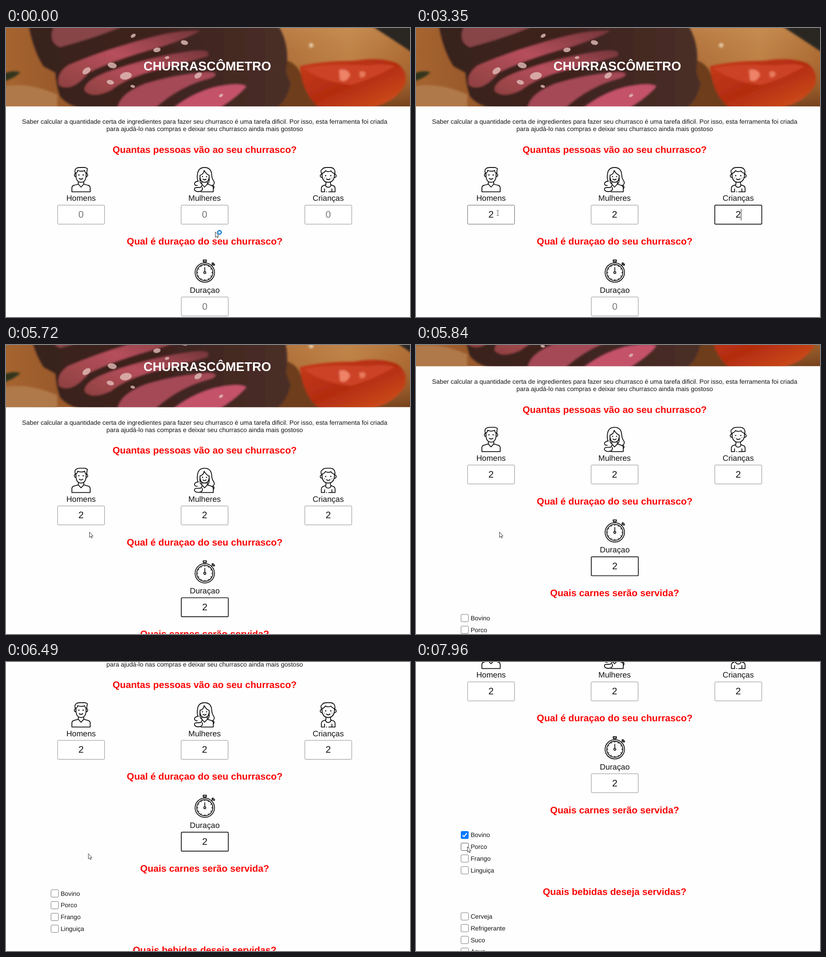
Recreate the animation shown at these times as an HTML page. Size 883 by 634 pixels, loop 8000 ms.

```html
<!DOCTYPE html>
<html lang="pt">
<head>
<meta charset="utf-8">
<title>Churrascômetro</title>
<style>
html, body { margin: 0; width: 100%; height: 100%; overflow: hidden; background: #fefefe; }
svg { display: block; width: 883px; height: 634px; font-family: "Liberation Sans", Arial, sans-serif; text-rendering: geometricPrecision; }
.mid { text-anchor: middle; }
.h { font-weight: bold; font-size: 20.7px; fill: #fb0505; }
.label { font-size: 17.25px; fill: #111; }
.p { font-size: 13.8px; fill: #161616; }
.num { font-size: 20.7px; }
.icon { fill: none; stroke: #111; stroke-width: 1.8; stroke-linecap: round; stroke-linejoin: round; }
.dot { fill: #111; stroke: none; }
</style>
</head>
<body>
<svg viewBox="0 0 883 634" xmlns="http://www.w3.org/2000/svg">
  <defs>
    <linearGradient id="wood">
      <stop offset="0" stop-color="#a5642f"/><stop offset=".12" stop-color="#9a5a2b"/>
      <stop offset=".7" stop-color="#b0713a"/><stop offset=".85" stop-color="#c08449"/><stop offset="1" stop-color="#a9672f"/>
    </linearGradient>
    <linearGradient id="shade" x2="0" y2="1">
      <stop offset="0" stop-color="#d09a5e" stop-opacity=".4"/><stop offset=".4" stop-color="#b87a40" stop-opacity=".2"/>
      <stop offset="1" stop-color="#5a2c10" stop-opacity=".65"/>
    </linearGradient>
    <linearGradient id="crust">
      <stop offset="0" stop-color="#38201c"/><stop offset=".6" stop-color="#402520"/><stop offset="1" stop-color="#4a2f28"/>
    </linearGradient>
    <linearGradient id="meat" x1="0" y1="1" x2="1" y2="0">
      <stop offset="0" stop-color="#8e4140"/><stop offset=".5" stop-color="#b64f5c"/><stop offset="1" stop-color="#75363a"/>
    </linearGradient>
    <linearGradient id="skin" x2="1" y2="1">
      <stop offset="0" stop-color="#c63c1c"/><stop offset=".5" stop-color="#b32c10"/><stop offset="1" stop-color="#d3541f"/>
    </linearGradient>
    <filter id="soft" x="-5%" y="-10%" width="110%" height="120%"><feGaussianBlur stdDeviation="2"/></filter>
    <clipPath id="crop"><rect width="883" height="172"/></clipPath>
  </defs>
  <rect width="883" height="634" fill="#fefefe"/>
  <g id="page">
    <g clip-path="url(#crop)">
      <rect width="883" height="172" fill="url(#wood)"/>
      <rect x="590" width="293" height="172" fill="url(#shade)"/>
      <g filter="url(#soft)">
        <path d="M-4 128Q50 118 112 146V176H-4Z" fill="#b0794a"/>
        <path d="M800 -4H888V54Q850 28 800 -4Z" fill="#2a2523"/>
        <path d="M-4 100Q14 92 31 97Q22 108 -4 117Z" fill="#33341d"/>
        <circle cx="667" cy="38" r="5" fill="#e3c7a2"/>
        <path d="M610 70Q640 78 648 112Q660 150 700 176H590Z" fill="#6d3c1c"/>
        <path d="M50 -4Q60 50 82 84L108 98Q110 128 118 150Q140 176 180 176H590Q614 160 622 122Q616 110 612 95Q622 40 596 -4Z" fill="url(#crust)"/>
        <path d="M105 -4H255Q200 20 118 42Q90 30 105 -4Z" fill="#874446"/>
        <path d="M116 126Q108 102 135 82Q220 46 320 20Q380 4 425 6Q390 25 330 44Q240 68 180 98Q145 142 116 126Z" fill="url(#meat)"/>
        <path d="M172 138Q168 114 235 92Q320 62 410 50Q450 46 440 62Q380 78 325 93Q262 110 230 136Q190 156 172 138Z" fill="url(#meat)"/>
        <path d="M244 176Q248 144 305 122Q370 102 440 97Q470 98 450 109Q380 126 325 176Z" fill="#a54956"/>
        <path d="M365 176Q405 144 455 130Q510 118 525 128Q505 152 465 176Z" fill="#c4526a"/>
        <path d="M642 84Q690 72 760 72Q820 62 856 78Q880 96 872 125Q850 164 800 174H685Q650 150 642 84Z" fill="url(#skin)"/>
        <path d="M650 88Q700 78 790 82Q830 76 850 84Q800 112 755 125Q690 118 650 88Z" fill="#cc4225"/>
        <path d="M728 92Q748 88 752 104Q742 122 730 114Z" fill="#ee8367"/>
        <path d="M772 97Q782 92 786 100Q784 110 774 108Z" fill="#e8795c"/>
      </g>
      <g id="salt" fill="#e2bfba" opacity=".8"></g>
    </g>
    <text class="mid" x="440" y="93" font-size="27.6" font-weight="bold" fill="#fff">CHURRASCÔMETRO</text>
    <g class="p mid">
      <text x="434.3" y="210.2">Saber calcular a quantidade certa de ingredientes para fazer seu churrasco é uma tarefa dificil. Por isso, esta ferramenta foi criada</text>
      <text x="434.3" y="226.4">para ajudá-lo nas compras e deixar seu churrasco ainda mais gostoso</text>
    </g>
    <g class="h mid">
      <text x="434.2" y="274">Quantas pessoas vão ao seu churrasco?</text>
      <text x="434.2" y="475.2">Qual é duraçao do seu churrasco?</text>
      <text x="434.2" y="676.7">Quais carnes serão servida?</text>
      <text x="434.2" y="855.5">Quais bebidas deseja servidas?</text>
    </g>
    <g class="icon" transform="translate(164 0)">
      <path d="M-20 359.3V351Q-20 346 -15 345L-6 342.500L0 349L6 342.500L15 345Q20 346 20 351V359.300ZM-6 342.500V338M6 342.500V338"/>
      <path d="M-11 318V325Q-10 338.500 0 338.500Q10 338.500 11 325V318"/>
      <path d="M-12.500 319Q-15 310 -10 308Q-8 306 -3 306H9L14 308.500Q12.500 313 12.500 319M-11 318Q-8 317 -7.500 312.500Q1 316 8 312.500Q8.500 317 11 318"/>
      <path d="M-11 319.500Q-14.800 319 -14.500 323Q-14 326 -11 326M11 319.500Q14.800 319 14.500 323Q14 326 11 326"/>
      <path d="M-4 330Q0 333.500 4 330"/>
      <path class="dot" d="M-6 322.500a1.400 1.400 0 1 0 2.800 0a1.400 1.400 0 1 0 -2.800 0M3.200 322.500a1.400 1.400 0 1 0 2.800 0a1.400 1.400 0 1 0 -2.800 0"/>
    </g>
    <g class="icon" transform="translate(434 0)">
      <path d="M-14 336Q-17 331 -15.500 321Q-14 306 0 306Q14 306 15.500 321Q16 330 19 334Q24 341 18 345Q23 348 19 353"/>
      <path d="M-14 336Q-22 337 -22 342Q-21 346 -16 345.500M-6 345Q-6 350 -12 350H-17Q-23 350 -22 355Q-20 359 -13 359Q-3 358 -5 350"/>
      <path d="M-8 359.300H19V351Q19 346 14 345L6 342.500L0 349L-6 342.500M-6 342.500V337M6 342.500V337"/>
      <path d="M-10 323V327Q-9 338.500 0 338.500Q9 338.500 10 327V323M-10 323Q-2 321 -1 312.500Q4 321 10 323M-10 328Q-11 336 -8 341M10 328Q11 336 8 341"/>
      <path d="M-3.500 331.500Q0 335 3.500 331.500"/>
      <path class="dot" d="M-5.700 326a1.300 1.300 0 1 0 2.600 0a1.300 1.300 0 1 0 -2.600 0M3.100 326a1.300 1.300 0 1 0 2.600 0a1.300 1.300 0 1 0 -2.600 0"/>
    </g>
    <g class="icon" transform="translate(704.300 0)">
      <path d="M-15 359.300V352Q-15 346 -8 345L-5 343V338M15 359.300V352Q15 346 8 345L5 343V338M-15 359.300H-8V353M15 359.300H8V353M-4 359.300H-3.500M1 359.300H8M-6 344.500Q-5 349.500 0 349.500Q5 349.500 6 344.500"/>
      <path d="M-13.500 319V326Q-11 338.500 0 338.500Q11 338.500 13.500 326V319"/>
      <path d="M-14.500 320Q-18 312 -13 310Q-11 306 -3 306H5Q16 307 14.500 320M-13.500 319Q-8 317 -6 313Q-1 317 6 313.500Q9 318 13.500 319"/>
      <path d="M-13.500 321Q-18 321 -17.300 325Q-17 328 -13 328M13.500 321Q18 321 17.300 325Q17 328 13 328"/>
      <path d="M-4 331Q0 334.500 4 331"/>
      <path class="dot" d="M-7 324a1.400 1.400 0 1 0 2.800 0a1.400 1.400 0 1 0 -2.800 0M4.200 324a1.400 1.400 0 1 0 2.800 0a1.400 1.400 0 1 0 -2.800 0M-9 329a.8.8 0 1 0 1.600 0a.8.8 0 1 0 -1.600 0M7.400 329a.8.8 0 1 0 1.600 0a.8.8 0 1 0 -1.600 0"/>
    </g>
    <g class="icon" transform="translate(434.500 536.500)">
      <circle r="21.200"/><circle r="17.500"/>
      <path d="M-3.500 -27.500H3.500V-24H-3.500ZM-2 -24V-21.500M2 -24V-21.500M14.500 -15.500L16.500 -17.500M15.500 -20L17.500 -21.500L21.500 -17.500L20 -15.500ZM0 -2.500V-11"/>
      <circle r="2.200"/>
      <g id="ticks" stroke-width="1.300"></g>
    </g>
    <g id="form"></g>
  </g>
  <g id="arrow">
    <path d="M.5 .5V12.200L3.200 9.700L5 13.600L6.600 12.900L4.900 9.100H8.400Z" fill="#fff" stroke="#222" stroke-width=".9"/>
    <circle id="busy" cx="9.600" cy="1.300" r="4" fill="#e8f4fc" stroke="#2387d3" stroke-width="2.800"/>
  </g>
  <path id="beam" d="M-2.500 -5.500H-.6L0 -5L.6 -5.500H2.500M0 -5V5M-2.500 5.500H-.6L0 5L.6 5.500H2.500" fill="none" stroke="#555"/>
</svg>
<script>
const LOOP = 8000, STEP = 172.5;
const $ = id => document.getElementById(id);
function add(parent, tag, attrs, text) {
  const el = document.createElementNS("http://www.w3.org/2000/svg", tag);
  for (const k in attrs) el.setAttribute(k, attrs[k]);
  if (text) el.textContent = text;
  parent.appendChild(el);
  return el;
}
const set = (el, k, v) => el.setAttribute(k, v);
const show = (el, on) => set(el, "visibility", on ? "visible" : "hidden");

[[176, 94, 10], [232, 82, 10], [262, 105, 13], [420, 104, 9], [390, 32, 8], [330, 48, 8],
 [278, 17, 6], [228, 119, 8], [352, 65, 5], [470, 148, 5], [277, 128, 5]].forEach(([x, y, r], i) =>
  add($("salt"), "ellipse", { rx: r, ry: r * .62, transform: `translate(${x} ${y}) rotate(${i * 47 % 70 - 35})` }));

for (let i = 0; i < 12; i += i % 3 ? 1 : 1)
  add($("ticks"), "path", { d: "M0 -14.8V-17", transform: `rotate(${i * 30})` });

// name, centre x, top y, focus on, typed, focus off
const fields = [
  ["Homens", 164, 388, 1270, 2130, 2450],
  ["Mulheres", 434, 388, 2450, 2760, 3060],
  ["Crianças", 704.3, 388, 3060, 3350, 4070],
  ["Duraçao", 434.4, 589.4, 4070, 4940, 7500]
].map(([name, x, y, from, typed, to]) => {
  const g = $("form");
  add(g, "text", { class: "label mid", x, y: y - 8.6 }, name);
  return {
    x, y, from, typed, to,
    box: add(g, "rect", { x: x - 51.2, y: y + .7, width: 102.6, height: 41.6, rx: 1.8 }),
    num: add(g, "text", { class: "num mid", x, y: y + 28.1 }),
    caret: add(g, "rect", { y: y + 9, width: 1, height: 25, fill: "#111" })
  };
});
const caretOff = [[1770, 2130], [3890, 4070], [4610, 4940], [5490, LOOP]];

function checkList(names, top) {
  return names.map((name, i) => {
    const y = top + i * 25.8, g = $("form");
    add(g, "text", { class: "p", x: 119.4, y: y + 13.3 }, name);
    return {
      y,
      box: add(g, "rect", { x: 98.4, y: y + .4, width: 16.2, height: 16.2, rx: 2 }),
      tick: add(g, "path", { d: `M101.8 ${y + 8.8}l3.2 3.4l6.3 -7.800`, fill: "none", stroke: "#fff", "stroke-width": 2.2 })
    };
  });
}
const checks = [
  ...checkList(["Bovino", "Porco", "Frango", "Linguiça"], 716),
  ...checkList(["Cerveja", "Refrigerante", "Suco", "Agua"], 894.6)
];

// pointer stops: time, x, y
const path = [
  [0, 457, 447], [29, 457, 447], [30, 430, 416], [145, 430, 416], [290, 299, 409], [485, 299, 409],
  [1015, 178.8, 405.8], [5480, 178.8, 405.8], [5600, 182, 410], [5980, 182, 410], [6125, 179.6, 420],
  [6500, 179.6, 420], [7420, 106, 380], [7640, 106, 380], [7955, 112, 405]
];
const clamp = v => Math.max(0, Math.min(1, v));
const ease = v => (1 - Math.cos(Math.PI * clamp(v))) / 2;

function pointer(t) {
  const i = path.findIndex(p => p[0] > t);
  if (i < 0) return path[path.length - 1].slice(1);
  const [a, ax, ay] = path[i - 1], [b, bx, by] = path[i], k = ease((t - a) / (b - a));
  return [ax + (bx - ax) * k, ay + (by - ay) * k];
}

function draw(t) {
  const scroll = STEP * (ease((t - 5618) / 343) + ease((t - 6375) / 343));
  const [x, y] = pointer(t), py = y + scroll;
  set($("page"), "transform", `translate(0 ${-scroll})`);

  let overField = false;
  for (const f of fields) {
    const focus = t >= f.from && t < f.to, typed = t >= f.typed;
    const hover = Math.abs(x - f.x) < 51.8 && py > f.y && py < f.y + 43;
    overField = overField || hover;
    set(f.box, "stroke", focus ? "#101010" : hover ? "#4f4f4f" : "#808080");
    set(f.box, "stroke-width", focus ? 1.7 : .9);
    set(f.box, "fill", "#fff");
    f.num.textContent = typed ? "2" : "0";
    set(f.num, "fill", typed ? "#111" : "#757575");
    set(f.caret, "x", Math.floor(f.x) + (typed ? 6 : 0));
    show(f.caret, focus && !caretOff.some(([a, b]) => t >= a && t < b));
  }

  checks.forEach((c, i) => {
    const on = i === 0 && t >= 7590;
    const hover = x >= 98 && x <= 115 && py >= c.y && py <= c.y + 17;
    const blue = hover ? "#005cc8" : "#0075ff";
    set(c.box, "fill", on ? blue : "#fff");
    set(c.box, "stroke", on ? blue : hover ? "#4f4f4f" : "#767676");
    show(c.tick, on);
  });

  set($("arrow"), "transform", `translate(${x} ${y})`);
  set($("beam"), "transform", `translate(${x} ${y})`);
  show($("arrow"), !overField);
  show($("busy"), !overField && t < 1000);
  show($("beam"), overField);
}

const start = performance.now();
function frame(now) {
  draw(Math.max(0, now - start) % LOOP);
  requestAnimationFrame(frame);
}
draw(0);
requestAnimationFrame(frame);
</script>
</body>
</html>
```
